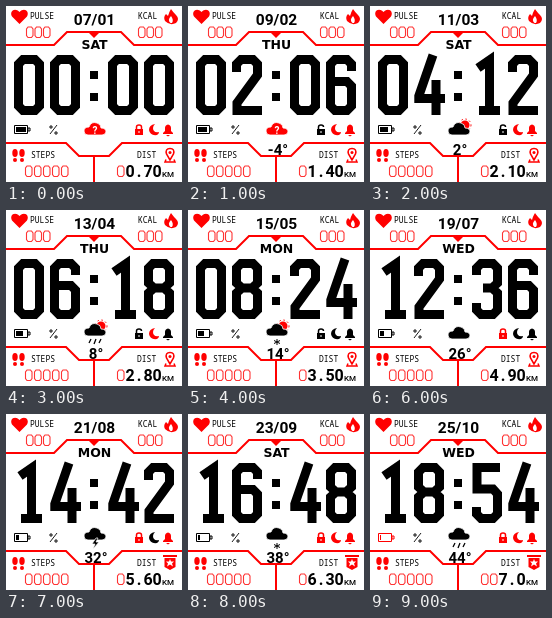
Recreate the animation shown at these times as an HTML page. Size 176x176 px, loop 10 s.

```html
<!DOCTYPE html>
<html lang="en">
<head>
<meta charset="utf-8">
<title>Watch face</title>
<style>
html, body { margin: 0; width: 100%; height: 100%; overflow: hidden; background: #fff; }
svg { display: block; width: 100vw; height: 100vh; }
text { font-family: Roboto, sans-serif; font-weight: 700; text-anchor: middle; }
.label { font: 500 8px "Noto Sans Mono", monospace; text-anchor: start; }
.day { font-family: "DejaVu Sans", sans-serif; }
.unit { font-weight: 500; }
.line { fill: none; stroke: #f00; stroke-width: 2; }
.zero { fill: none; stroke: #f33; stroke-width: 1.1; }
.big { fill: none; stroke: #000; stroke-width: 9; }
</style>
</head>
<body>
<svg viewBox="0 0 176 176">
  <g class="line">
    <path d="M0 39H48L61 26H115L128 39H176"/>
    <path d="M0 137H60L73 150H103L116 137H176M88 150V176"/>
  </g>
  <path fill="#f00" d="M82 26H94L88 32Z"/>
  <text class="label" x="24" y="13">PULSE</text>
  <text class="label" x="132" y="13">KCAL</text>
  <text class="label" x="25" y="152">STEPS</text>
  <text class="label" x="131" y="152">DIST</text>
  <g fill="#f00">
    <path d="M13.5 18L6 10.5C3 5 9 1 13.5 6C18 1 24 5 21 10.5Z"/>
    <path d="M165 3Q167 6 170 9Q174 13 170 17Q164 20 159 15Q157 11 160 8L162 10Q163 6 165 3Z"/>
    <path fill="#fff" d="M164.500 17Q161 14 165 10Q168 14 166 17Z"/>
    <ellipse cx="9" cy="147" rx="2.7" ry="4"/><ellipse cx="16" cy="147" rx="2.7" ry="4"/>
    <circle cx="9" cy="154" r="2"/><circle cx="16" cy="154" r="2"/>
  </g>
  <g id="face"></g>
</svg>
<script>
const RED = '#f00', BLACK = '#000';
const DAYS = ['SUN', 'MON', 'TUE', 'WED', 'THU', 'FRI', 'SAT'];
const WEATHER = ['unknown', 'unknown', 'partly', 'sunRain', 'sunSnow', 'sun', 'cloud', 'thunder', 'snow', 'rain'];
// Red flags for lock, moon and bell
const FLAGS = ['111', '011', '011', '010', '000', '000', '100', '101', '111', '111'];

// Centre lines of the large digits in a 30 by 60 cell
const DIGITS = {
  0: 'M9 4.5H21L25.5 9V51L21 55.5H9L4.5 51V9Z',
  1: 'M6 13L17.5 5V55M7 55.5H28',
  2: 'M4.5 17V9L9 4.5H21L25.5 9V20L5 48V55.5H30',
  3: 'M4.5 16V9L9 4.5H21L25.5 9V24L20 29L25.5 34V51L21 55.5H9L4.5 51V44M11 29H21',
  4: 'M19 0L4.8 41V43.5H31M22 25V60',
  5: 'M28 4.5H5V26H21L25.5 31V51L21 55.5H9L4.5 51V44',
  6: 'M25.5 16V9L21 4.5H9L4.5 9V51L9 55.5H21L25.5 51V31L21 26.5H5',
  8: 'M9 4.5H21L25.5 9V24L20 29L25.5 34V51L21 55.5H9L4.5 51V34L10 29L4.5 24V9ZM9 29H21'
};

const pad = n => String(n).padStart(2, '0');
const path = (d, fill, extra = '') => `<path d="${d}" fill="${fill}" ${extra}/>`;
const text = (s, x, y, size, extra = '') => `<text x="${x}" y="${y}" font-size="${size}" ${extra}>${s}</text>`;
const zeros = (x, y, count, step) => Array.from({ length: count }, (_, i) =>
  `<path class="zero" d="M${x + i * step + 2} ${y}h3.5l1.5 2v6.5l-1.5 2h-3.5l-1.5 -2v-6.5z"/>`).join('');

function clock(k) {
  const chars = pad(2 * k) + pad(6 * k);
  return [8, 44, 102, 138].map((x, i) =>
    `<path class="big" transform="translate(${x} 49)" d="${DIGITS[chars[i]]}"/>`).join('')
    + path('M84 65h8v8h-8zM84 87h8v8h-8z', BLACK);
}

function weather(kind) {
  const cloud = color => path('M82 129Q78 129 78 125Q78 121 83 121Q85 115 91 117Q95 118 95 122Q100 122 100 126Q99 129 96 129Z',
    color, 'stroke="#fff" stroke-width=".8"');
  const sun = (x, y, r) => `<circle cx="${x}" cy="${y}" r="${r}" fill="${RED}"/>`
    + `<circle cx="${x}" cy="${y}" r="${r + 1.5}" fill="none" stroke="${RED}" stroke-dasharray="1.5 2.5"/>`;
  if (kind === 'unknown') return cloud(RED) + text('?', 89, 128, 10, 'fill="#fff"');
  if (kind === 'sun') return sun(88, 124, 6);
  if (kind === 'cloud') return cloud(BLACK);
  let out = (/sun|partly/.test(kind) ? sun(95, 119, 4.5) : '') + cloud(BLACK);
  if (kind === 'partly') return out;
  if (/rain/i.test(kind)) out += path('M85 132l-2 4M90 132l-2 5M95 132l-2 4', 'none', 'stroke="#000" stroke-width="1.3"');
  if (/snow/i.test(kind)) out += path('M89 132v6M86 133.500l6 3M92 133.500l-6 3', 'none', 'stroke="#000"');
  if (kind === 'thunder') out += path('M90 127l-4 6h3l-2 5 6-7h-3l2-4z', BLACK, 'stroke="#fff" stroke-width=".7"');
  return `<g transform="translate(0 -3)">${out}</g>`;
}

function status(k) {
  const [lock, moon, bell] = [...FLAGS[k]].map(f => f === '1');
  const color = on => on ? RED : BLACK;
  return path('M129 123h8v6h-8z', color(lock))
    + path(lock ? 'M130.5 123v-2q0-2 2.5-2t2.5 2v2' : 'M130.5 123v-2q0-2 2.5-2t2.5 2',
      'none', `stroke="${color(lock)}" stroke-width="1.5"`)
    + path('M132.5 125h1v2h-1z', '#fff')
    + path('M149 118Q143 119 143 124Q144 130 151 129Q153 128 153 126Q147 127 147 122Q147 120 149 118Z', color(moon))
    + path('M157 128V127L159 125V122Q159 119 162 118.5Q165 119 165 122V125L167 127V128ZM160 129h4l-2 1.5z', color(bell));
}

function battery(k) {
  const color = k === 9 ? RED : BLACK;
  return path('M8.5 119.5h13v8h-13zM22 122h2v3h-2z', 'none', `stroke="${color}"`)
    + path(`M10 121h${10 - k}v5h-${10 - k}z`, color)
    + path('M44 128L51 119M44 120h2v2h-2zM49 126h2v2h-2z', 'none', 'stroke="#000" stroke-width=".9"');
}

function distance(k) {
  const value = k === 9 ? '7.0' : (.7 * (k + 1)).toFixed(2);
  const start = 151 - 9 * (value.length - 1);
  const blanks = 5 - value.length;
  return zeros(start - 4 - 9 * blanks, 160, blanks, 9)
    + [...value].map((c, i) => text(c, start + 9 * i, 171, 16)).join('')
    + text('KM', 162, 171, 8, 'class="unit"');
}

const goal = k => k < 7
  ? path('M164 154L160.500 148Q159 142.500 164 142.500Q169 142.500 167.500 148ZM160 153.500l-1 2.500h10l-1-2.500', 'none', 'stroke="#f00" stroke-width="1.5"')
    + '<circle cx="164" cy="146.500" r="1.5" fill="#f00"/>'
  : path('M157 141h14v2h-14zM158.500 144h11v9l-5.500 3-5.500-3z', RED)
    + path('M164 145l1 2.500h3l-2 2 1 3-3-2-3 2 1-3-2-2h3z', '#fff');

function face(k) {
  const day = 7 + 2 * k;
  const weekday = DAYS[new Date(2023, k, day).getDay()];
  return text(`${pad(day)}/${pad(k + 1)}`, 88.5, 19, 15.5)
    + text(weekday, 88.5, 43, 12.5, 'class="day"')
    + clock(k) + battery(k) + weather(WEATHER[k]) + status(k)
    + (k ? text(`${6 * k - 10}°`, 90, 148.5, 15) : '')
    + zeros(20, 21, 3, 8.5) + zeros(132, 21, 3, 8.5) + zeros(19, 160, 5, 9)
    + distance(k) + goal(k);
}

const stage = document.getElementById('face');
const begin = performance.now();
let shown = -1;
function tick(now) {
  const k = Math.floor(Math.max(0, now - begin) / 1000) % 10;
  if (k !== shown) stage.innerHTML = face(shown = k);
  requestAnimationFrame(tick);
}
tick(begin);
</script>
</body>
</html>
```
